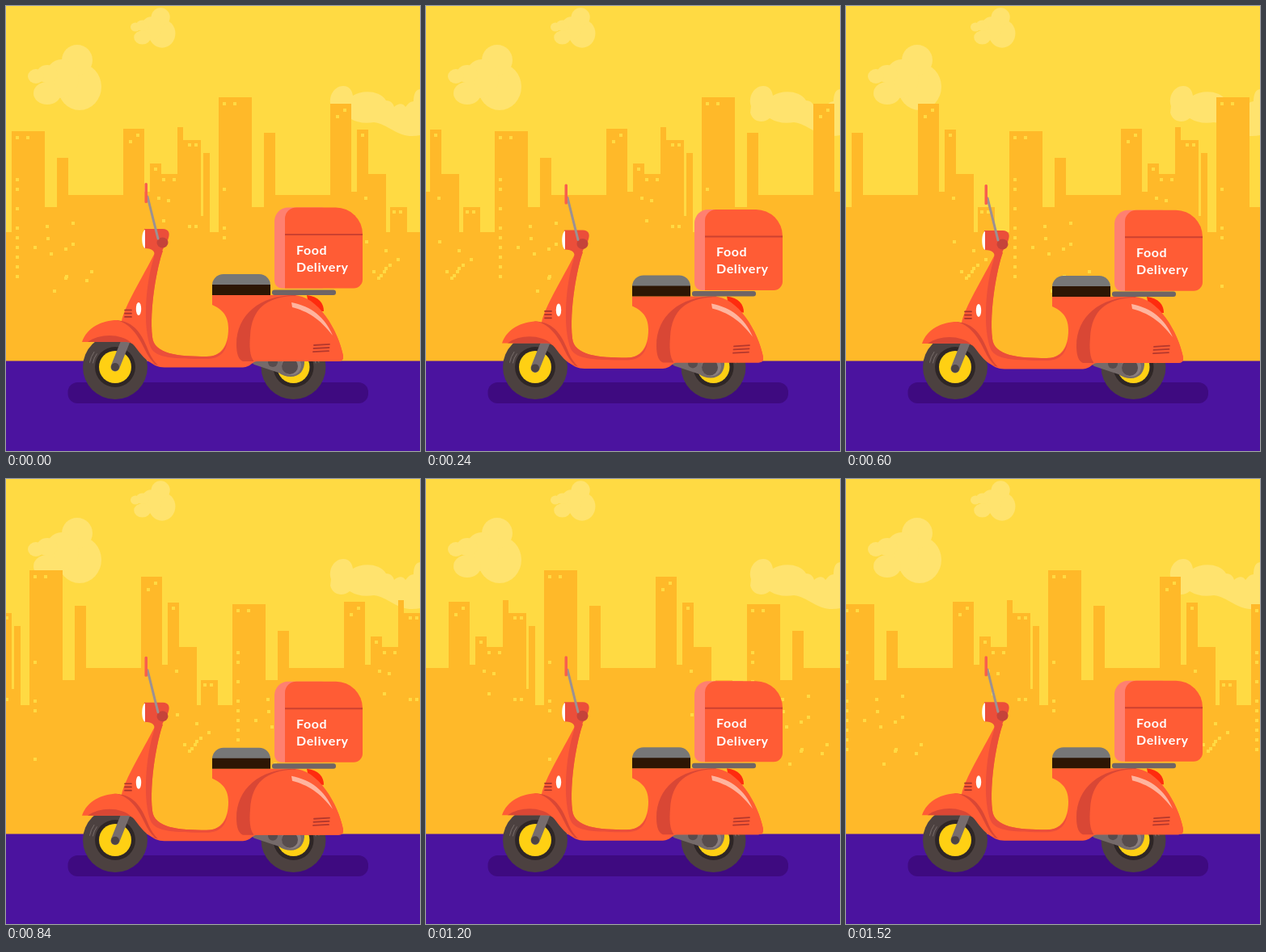
An HTML page with a canvas that plays this animation: 512x551 px, repeating every 1.56 s.

```html
<!DOCTYPE html>
<html lang="en">
<head>
<meta charset="utf-8">
<title>Food delivery scooter</title>
<style>
html, body { margin: 0; width: 100%; height: 100%; overflow: hidden; background: #ffda43; }
canvas { display: block; }
</style>
</head>
<body>
<canvas id="stage" width="512" height="551"></canvas>
<script>
const ctx = document.getElementById('stage').getContext('2d');
const LOOP = 1560, STEP = 40, CITY_WIDTH = 507, SPEED = CITY_WIDTH * STEP / LOOP;
const BOB_PERIOD = LOOP / 4, BOB_HEIGHT = 4, GROUND = 439.5;
const ORANGE = '#ff5c35', DARK = '#d94735', EDGE = '#eb4e3a';
const YELLOW = '#ffda43', CITY = '#ffb929', CLOUD = '#ffe36e';

function seeded(seed) {
  return () => (seed = (seed * 16807) % 2147483647) / 2147483647;
}

function shape(color, d) {
  ctx.fillStyle = color;
  ctx.fill(new Path2D(d));
}

function line(color, width, d) {
  ctx.strokeStyle = color;
  ctx.lineWidth = width;
  ctx.stroke(new Path2D(d));
}

function rect(color, x, y, w, h, radii = 0) {
  ctx.fillStyle = color;
  ctx.beginPath();
  ctx.roundRect(x, y, w, h, radii);
  ctx.fill();
}

function oval(color, x, y, rx, ry = rx) {
  ctx.fillStyle = color;
  ctx.beginPath();
  ctx.ellipse(x, y, rx, ry, 0, 0, Math.PI * 2);
  ctx.fill();
}

function shifted(dx, dy, draw) {
  ctx.save();
  ctx.translate(dx, dy);
  draw();
  ctx.restore();
}

function drawPuffCloud(x, y, size) {
  const puff = (dx, dy, rx, ry = rx) =>
    oval(CLOUD, x + dx * size, y + dy * size, rx * size, ry * size);
  puff(0, 0, 27, 29);
  puff(-3, -33, 19);
  puff(-22, -10, 21, 24);
  puff(-40, -16, 13, 11);
  puff(-54, -13, 10, 9);
  puff(-40, 8, 17, 14);
}

function drawClouds() {
  drawPuffCloud(91, 100, 1);
  drawPuffCloud(193, 34, 0.61);
  shape(CLOUD, `M402 124 C398 112 406 99 417 99 C425 99 428 105 429 111
    C440 104 462 104 470 117 C476 117 479 121 480 125 C486 119 492 121 494 125
    C497 122 498 119 504 118 Q504 104 512 103 V160
    C486 166 474 146 455 144 Q438 147 425 139 C417 146 404 144 401 132 Z`);
}

const building = (x, roof, width) => rect(CITY, x, roof, width, GROUND + 1 - roof);
const pane = (x, y) => rect(YELLOW, x - 2, y - 2, 4, 4);

// The same run of buildings appears twice, with other roof heights.
function drawBlock(x, tower, slab, office, annex, random) {
  building(x + 7, tower, 41);
  building(x + 48, 249, 29);
  building(x + 63, slab, 14);
  building(x + 77, 234, 68);
  building(x + 145, office, 26);
  building(x + 171, 230, 21);
  building(x + 178, annex, 14);
  building(x + 192, 208, 20);

  pane(x + 27, tower + 8);
  pane(x + 14, tower + 8);
  for (let y = 215; y < 355; y += 12) if (random() < 0.6) pane(x + 14, y);
  pane(x + 154, office + 16);
  pane(x + 163, office + 8);
  pane(x + 185, annex + 7);
  pane(x + 195, 215);
  pane(x + 208, 215);
  pane(x + 189, 238);
  pane(x + 201, 241);
  pane(x + 195, 266);
}

function drawCity() {
  const random = seeded(71);
  const scatter = (count, x, y, w, h) => {
    while (count--) pane(x + Math.round(random() * w), y + Math.round(random() * h));
  };
  building(7, 280, CITY_WIDTH);
  drawBlock(0, 155, 188, 152, 195, random);
  drawBlock(256, 113, 157, 121, 153, random);
  building(212, 150, 7);
  building(219, 166, 25);
  building(244, 182, 8);
  building(448, 208, 22);
  building(475, 249, 21);
  rect(YELLOW, 241, 166, 3, 94);

  for (const x of [227, 235]) {
    pane(x, 172);
    pane(x, 273);
    pane(x + 253, 255);
  }
  scatter(12, 30, 257, 83, 102);
  scatter(9, 444, 288, 47, 50);
}

function drawWheel(x, glint) {
  oval('#4c4140', x, 447, 40);
  oval('#2e2626', x, 447, 25);
  oval('#ffd013', x, 447, 20);
  ctx.strokeStyle = '#786d6b';
  ctx.lineWidth = 1;
  for (const radius of [28, 32]) {
    ctx.beginPath();
    ctx.arc(x, 447, radius, glint - 0.22, glint + 0.22);
    ctx.stroke();
  }
}

function drawRunningGear() {
  line('#776c6d', 11, 'M149 412 L135 447');
  oval('#4d4343', 135, 447, 5);
  shape('#756a6a', 'M299 438 H369 C370 451 363 459 352 459 Q344 459 337 454 L307 444 Z');
  oval('#574c4d', 330, 441, 6);
  oval('#8b7f7f', 353, 445, 12);
  oval('#574c4d', 351, 446, 10);
}

function drawHandlebar() {
  shape(EDGE, `M171 276 H194 C201 276 203 281 201 287 C199 294 195 298 193 304
    L183 311 C185 304 182 300 171 300 Z`);
  shape('#ffffff', 'M172 277 C167 279 167 298 172 300 Z');
  oval('#c5433a', 193.5, 293, 7, 6.5);
  line('#9c9192', 3, 'M175 236 L188 288');
  rect('#f95f4c', 171.5, 219, 3.5, 25, 1.5);
}

function drawFrame() {
  shape('#ff2b0e', 'M372 358 C387 360 393 368 393 378 H376 Z');
  const innerEdge = 'L194 303 C187 322 177 375 181 410 C183 431 213 434 248 434';
  shape(ORANGE, `M143 390 C147 371 168 337 184 306 ${innerEdge}
    C266 434 275 421 275 399 C275 382 266 375 255 370 V358 H355
    C386 358 411 402 417 433 Q418 440 411 440 H311
    C304 440 303 447 293 447.500 H196 C180 447 174 437 165 424 L143 404 Z`);
  shape(EDGE, `M184 308 ${innerEdge} C262 434 271 427 274 414
    C272 430 263 437 247 437 C209 437 185 436 179 423 C169 398 172 343 184 308 Z`);
  shape(DARK, `M134 389 C160 389 169 409 177 429 Q181 438 188 445
    C175 442 168 429 161 420 L143 402 Z`);
  shape(ORANGE, `M94 416 C100 398 119 389 137 389 C153 393 163 407 171 424
    Q177 437 184 443 C173 441 167 431 159 421 Q155 416 149 416 Z`);
  shape(DARK, 'M101 416 C116 405 143 405 156 418 Q153 416 149 416 Z');
  oval('#ffffff', 164, 375, 3.2, 8);
  line('#a8342b', 1.7, 'M147 376.500 h8 m-8 4.200 h8 m-8 4.200 h8');
}

function drawRear() {
  shape(DARK, 'M360 358 C315 357 285 382 285 419 Q285 437 293 440 H306 L326 370 Z');
  shape(ORANGE, `M307 440 C301 434 301 420 302 408 C304 374 323 361 354 359
    C385 358 411 402 417 433 Q418 440 411 440 Z`);
  shape('#ffb49e', 'M353 367 C378 372 394 385 404 408 C388 387 373 378 354 373 Z');
  line('#b4382d', 1.8, 'M381 420 l19 -1.200 m-19.500 5.200 l19 -1 m-19.500 5.200 l19 -1');

  rect('#777777', 255, 332, 72, 15, [14, 14, 0, 0]);
  rect('#2d1604', 255, 345, 72, 13);
  rect('#6f6465', 329, 351.5, 79, 6.5, 3);
}

function drawBox() {
  rect('#ff8070', 332, 249.5, 60, 100, [17, 0, 0, 9]);
  rect(ORANGE, 345, 249.5, 96, 100, [14, 33, 11, 0]);
  rect('#cc4130', 345, 282, 96, 2);
  ctx.fillStyle = '#ffffff';
  ctx.font = 'bold 16px Lato, sans-serif';
  ctx.letterSpacing = '0.6px';
  ctx.fillText('Food', 359, 307.5);
  ctx.fillText('Delivery', 359, 329);
}

// A steady drop to the middle of the cycle, then a rebound that slows down.
function bounce(time) {
  const u = time % BOB_PERIOD / BOB_PERIOD;
  const peak = 0.487;
  return u < peak ? u / peak : ((1 - u) / (1 - peak)) ** 1.8;
}

function render(now) {
  const step = Math.floor(now % LOOP / STEP);
  const bob = BOB_HEIGHT * bounce(step * STEP);

  rect(YELLOW, 0, 0, 512, 551);
  drawClouds();
  const offset = step * SPEED;
  shifted(offset, 0, drawCity);
  shifted(offset - CITY_WIDTH, 0, drawCity);
  rect('#4b139f', 0, GROUND, 512, 112);
  rect('#3e0a80', 76.5, 466, 371.5, 26, 12);

  drawWheel(135, Math.PI + 0.4);
  drawWheel(355.5, -0.4);
  shifted(0, bob, drawBox);
  shifted(0, bob * 0.58, () => {
    drawRunningGear();
    drawFrame();
    drawHandlebar();
    drawRear();
  });
}

const start = performance.now();
function tick() {
  render(performance.now() - start);
  requestAnimationFrame(tick);
}
ctx.lineCap = 'round';
tick();
</script>
</body>
</html>
```
